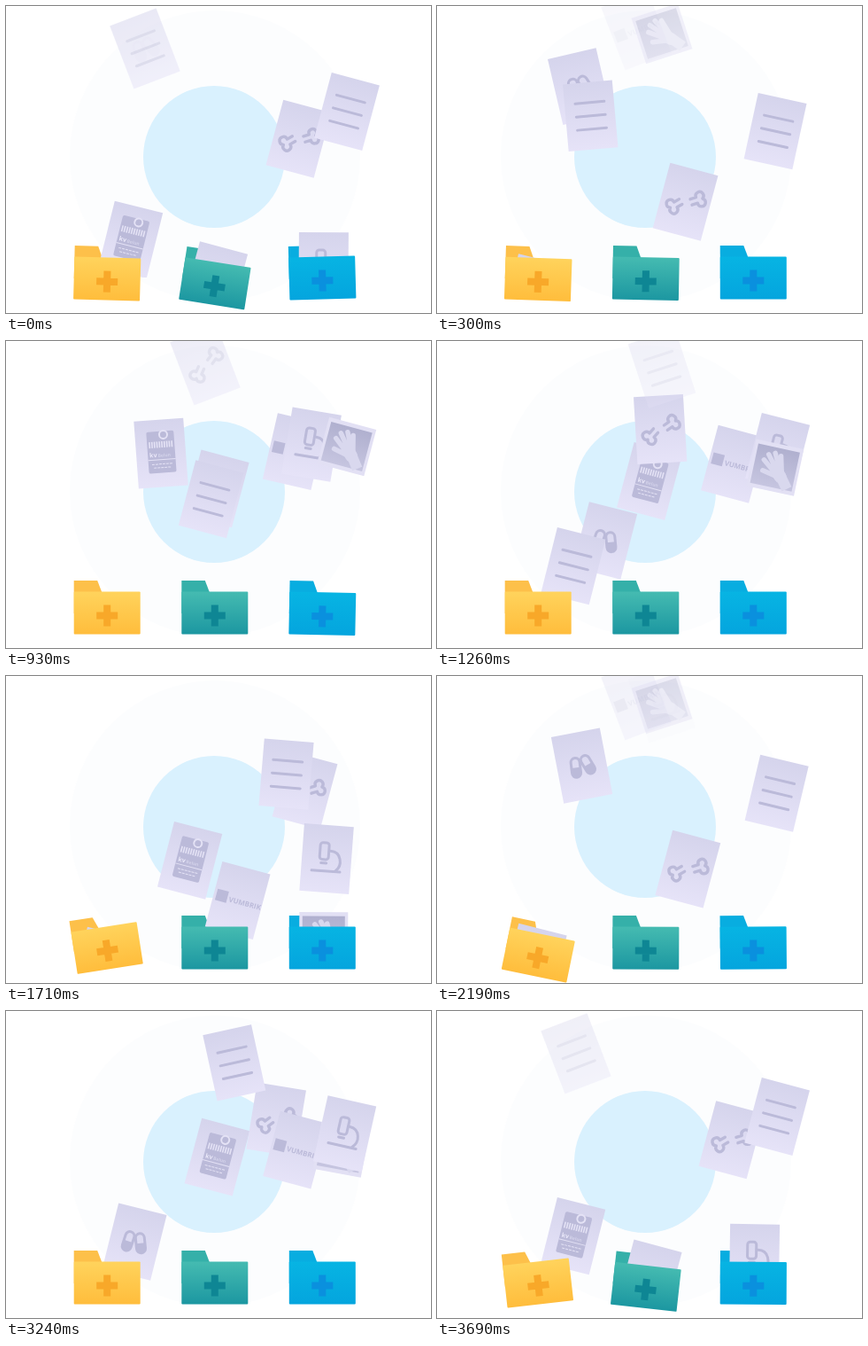
These frames come from a looping animation (480x346 px, 3.72 s). An HTML page:

```html
<!DOCTYPE html>
<html lang="en">
<head>
<meta charset="utf-8">
<title>Documents sorting into folders</title>
<style>
  html, body { margin: 0; width: 100%; height: 100%; overflow: hidden; background: #fff; }
  svg { display: block; width: 480px; height: 346px; }
  text { font-family: "Open Sans", Arial, sans-serif; font-weight: 700; }
  .ink { fill: none; stroke: #bbbad9; stroke-width: 3; stroke-linecap: round; stroke-linejoin: round; }
  .solid { fill: #bbbad9; }
  .pale { fill: none; stroke: #e4e2f5; }
</style>
</head>
<body>
<svg viewBox="0 0 480 346" xmlns="http://www.w3.org/2000/svg">
  <defs>
    <linearGradient id="paper" x2="0" y2="1"><stop stop-color="#d5d4ec"/><stop offset="1" stop-color="#e6e3f8"/></linearGradient>
    <linearGradient id="shot" x2="0" y2="1"><stop stop-color="#b0b0cf"/><stop offset="1" stop-color="#c6c5e0"/></linearGradient>
    <linearGradient id="yellow" x2="0" y2="1"><stop stop-color="#ffd35c"/><stop offset="1" stop-color="#ffbd3c"/></linearGradient>
    <linearGradient id="teal" x2="0" y2="1"><stop stop-color="#45bbb1"/><stop offset="1" stop-color="#1c97a1"/></linearGradient>
    <linearGradient id="blue" x2="0" y2="1"><stop stop-color="#07b4e3"/><stop offset="1" stop-color="#04a5de"/></linearGradient>
    <clipPath id="above"><rect width="480" height="306"/></clipPath>

    <rect id="sheet" x="-28" y="-38" width="56" height="76" fill="url(#paper)"/>
    <g id="lines"><use href="#sheet"/><path class="ink" d="M-16-15H17M-16 0H17M-16 15H17"/></g>
    <g id="card">
      <use href="#sheet"/>
      <rect class="solid" x="-15" y="-25" width="31" height="47" rx="2"/>
      <circle cx="4" cy="-21" r="4.5" fill="#bbbad9" stroke="#e4e2f5" stroke-width="2"/>
      <path class="pale" stroke-width="7" stroke-dasharray="1.6 1.2" d="M-13-10H14"/>
      <text x="-13" y="4" font-size="7" fill="#eceafa">kv<tspan font-size="5" fill="#d3d2ea" dx="1">Belun</tspan></text>
      <path class="pale" d="M-15 7H16"/>
      <path class="pale" stroke-dasharray="3 1" d="M-11 12H12M-9 16H10"/>
    </g>
    <path id="half" class="ink" d="M6-3H0A4 4 0 1 0-6 0A4 4 0 1 0 0 3H6"/>
    <g id="bones">
      <use href="#sheet"/>
      <use href="#half" transform="translate(-10 6) rotate(-45) scale(1.12)"/>
      <use href="#half" transform="translate(12 -5) rotate(148) scale(1.12)"/>
    </g>
    <g id="pill">
      <rect class="ink" x="-5" y="-11" width="10" height="22" rx="5"/>
      <path class="solid" d="M-5 0H5V6A5 5 0 0 1-5 6Z"/>
    </g>
    <g id="pills">
      <use href="#sheet"/>
      <use href="#pill" transform="translate(-7 1) rotate(4)"/>
      <use href="#pill" transform="translate(7 0) rotate(-20)"/>
    </g>
    <g id="scope">
      <use href="#sheet"/>
      <rect class="ink" x="-8" y="-18" width="10" height="19" rx="3"/>
      <path class="ink" d="M-6 5H0M4-9C16-9 19 6 11 13M-16 14H16"/>
    </g>
    <g id="brand">
      <use href="#sheet"/>
      <rect class="solid" x="-25" y="-7" width="13" height="13"/>
      <text class="solid" x="-10" y="4" font-size="8">VUMBRIK</text>
    </g>
    <g id="photo">
      <rect x="-27.500" y="-27" width="55" height="54" fill="#e2e0f4"/>
      <rect x="-24" y="-22.500" width="48" height="45" fill="url(#shot)"/>
      <g fill="none" stroke="#d9d8ee" stroke-linecap="round">
        <path stroke-width="5.500" d="M0 5L-14-6M2 2L-10-13M5 0L-3-16M8 2L4-14M2 9L-13 6"/>
        <path stroke-width="14" d="M4 5L8 9"/>
        <path stroke-width="12" stroke-linecap="butt" d="M8 8L18 21"/>
      </g>
    </g>
  </defs>
  <circle cx="236" cy="169" r="164" fill="#fcfdfe"/>
  <circle cx="235" cy="170" r="80" fill="#d9f1fe"/>
  <g id="backs"></g>
  <g clip-path="url(#above)"><g id="docs"></g></g>
  <g id="fronts"></g>
</svg>
<script>
const LOOP = 3720;
// Length of each stage of a drop
const GLIDE = 650, FALL = 640, SETTLE = 310, SINK = 100;
const LEAD = 130, FADE = 300;
const SWING = 108, CALM = 380;

const layer = id => document.getElementById(id);
const mod = (a, n) => ((a % n) + n) % n;
const easeInOut = s => (1 - Math.cos(Math.PI * s)) / 2;
const easeOut = s => 1 - (1 - s) ** 2;
const mix = (a, b, s) => a.map((v, i) => v + (b[i] - v) * s[i]);

function add(parent, name, attrs = {}) {
  const el = document.createElementNS("http://www.w3.org/2000/svg", name);
  for (const k in attrs) el.setAttribute(k, attrs[k]);
  return parent.appendChild(el);
}

// Each folder's route: x, y, angle at four points; hit is the age at impact
const folders = {
  yellow: {
    x: 114.2, tab: "#fdc04a", plus: "#f8a829", swing: 13, hit: 1540,
    from: [157, 48, -21], turn: [240, 158, 15], gate: [141, 263, 14], slot: [110, 323, 14]
  },
  teal: {
    x: 235.8, tab: "#35b0a9", plus: "#0e8694", swing: 13, hit: 1442,
    from: [225, 27, -21], turn: [338, 125, 15], gate: [272, 230, 15], slot: [230, 323, 15]
  },
  blue: {
    x: 357.3, tab: "#08ade0", plus: "#0a90de", swing: 2, hit: 1445,
    from: [254, 31, -18], turn: [385, 119, 15], gate: [358, 216, 3], slot: [359, 335, -1]
  }
};

for (const [name, f] of Object.entries(folders)) {
  f.drops = [];
  f.back = add(layer("backs"), "path", { d: "M-37.500-37H-11L-6-24V0H-37.500Z", fill: f.tab });
  f.front = add(layer("fronts"), "g");
  add(f.front, "rect", { x: -37.5, y: -24.5, width: 75, height: 48, rx: 1, fill: `url(#${name})` });
  add(f.front, "path", { d: "M0-9.500V14.500M-12 2.500H12", stroke: f.plus, "stroke-width": 8 });
}

function drop(kind, name, ...starts) {
  for (const start of starts)
    folders[name].drops.push({ start, el: add(layer("docs"), "use", { href: "#" + kind }) });
}

// Back to front
drop("pills", "yellow", 100, 1960);
drop("card", "yellow", 620, 2430);
drop("lines", "yellow", 0);
drop("bones", "teal", 940, 2760);
drop("brand", "teal", 380, 2240);
drop("photo", "blue", 2195);
drop("scope", "blue", 455, 2305);
drop("photo", "blue", 295);
drop("lines", "blue", 1305, 3065);

// Like a falling leaf: glide sideways, drop back, slide into the folder
function pose(f, age) {
  if (age < GLIDE) {
    const u = easeInOut(Math.max(0, age / GLIDE));
    return mix(f.from, f.turn, [u * u, easeOut(u), u]);
  }
  age -= GLIDE;
  if (age < FALL) {
    const v = age / FALL;
    return mix(f.turn, f.gate, [v ** 3, v ** 2, v ** 2]);
  }
  age -= FALL;
  const w = easeOut(Math.min(1, age / SETTLE));
  const [x, y, r] = mix(f.gate, f.slot, [w, w, w]);
  return [x, y + Math.max(0, age - SETTLE) * 0.3, r];
}

function draw(t) {
  for (const f of Object.values(folders)) {
    let since = LOOP;
    for (const { start, el } of f.drops) {
      const age = mod(t - start + LEAD, LOOP) - LEAD;
      const live = age < GLIDE + FALL + SETTLE + SINK;
      since = Math.min(since, mod(t - start - f.hit, LOOP));
      el.style.display = live ? "" : "none";
      if (!live) continue;
      const [x, y, r] = pose(f, age);
      el.setAttribute("transform", `translate(${x} ${y}) rotate(${r})`);
      el.setAttribute("opacity", Math.min(1, (age + LEAD) / FADE));
    }
    const tilt = f.swing * Math.max(0, 1 - since / CALM) * Math.sin(2 * Math.PI * since / SWING);
    const move = `translate(${f.x} ${307 + Math.max(0, tilt) * 0.7}) rotate(${tilt})`;
    f.back.setAttribute("transform", move);
    f.front.setAttribute("transform", move);
  }
}

const begin = performance.now();
function tick() {
  draw((performance.now() - begin) % LOOP);
  requestAnimationFrame(tick);
}
tick();
</script>
</body>
</html>
```
